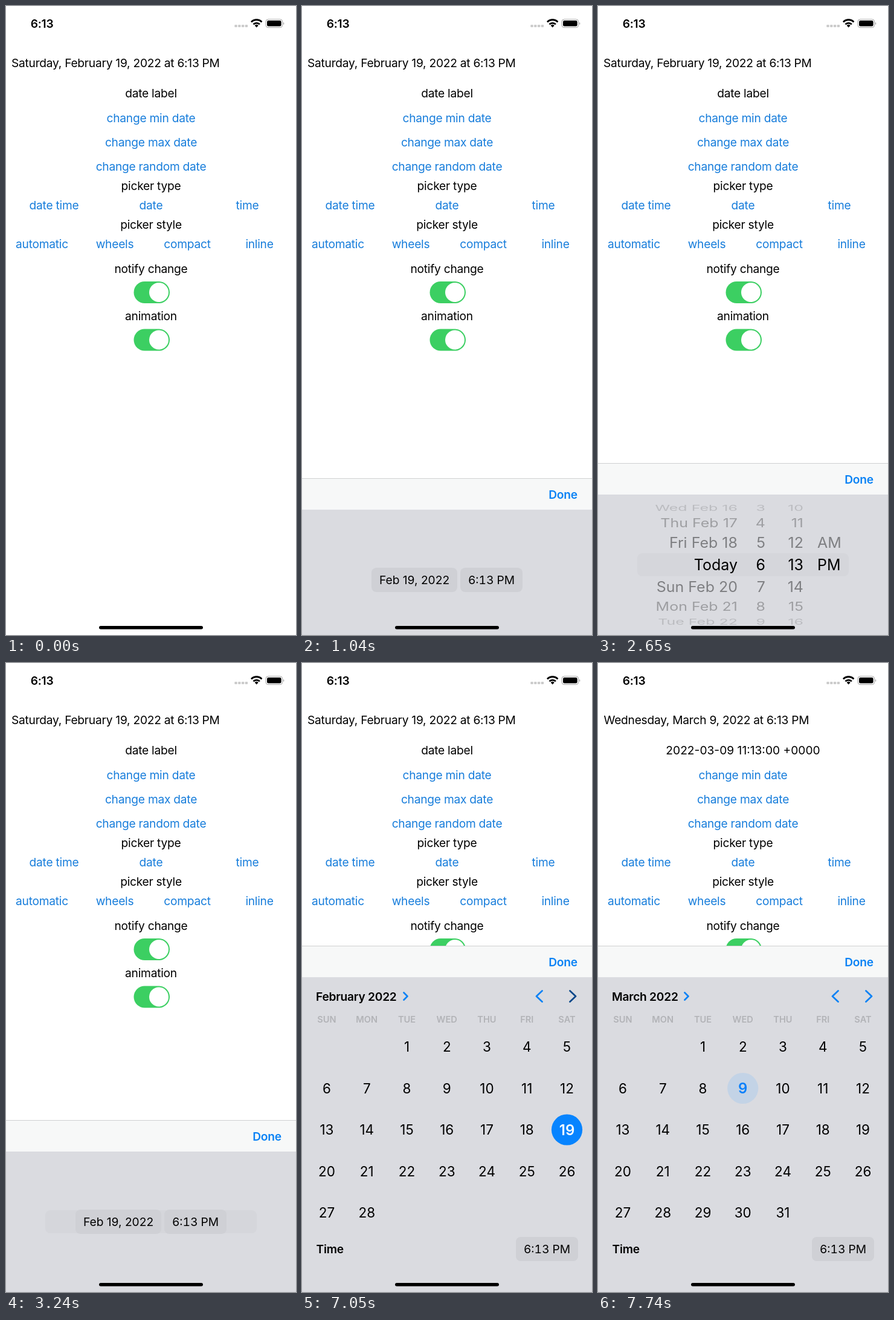
These frames come from a looping animation (480 by 1039 pixels, 8000 ms). An HTML page:

```html
<!DOCTYPE html>
<html lang="en">
<head>
<meta charset="utf-8">
<title>Date picker styles</title>
<style>
  html, body { margin: 0; width: 100%; height: 100%; overflow: hidden; background: #fff; }
  svg { display: block; width: 100vw; height: 100vh; }
  text { font: 400 19.2px Inter, "Open Sans", sans-serif; letter-spacing: -.0135em; white-space: pre; }
  .mid { text-anchor: middle; }
  .end { text-anchor: end; }
  .link { fill: #177ddb; }
  .bold { font-weight: 600; }
  .blue { fill: #0a82f5; }
  .chip { letter-spacing: 0; }
  .time { font-feature-settings: "tnum"; }
  .day { font-size: 22.5px; letter-spacing: 0; }
  .picked { font-size: 24px; font-weight: 600; letter-spacing: 0; }
  .week { font-size: 14.6px; font-weight: 600; letter-spacing: 0; fill: #b2b3b7; }
  .wheel { font-size: 25px; letter-spacing: 0; }
  .chevron { fill: none; stroke: #0a82f5; stroke-width: 2.7; stroke-linecap: round; stroke-linejoin: round; }

  /* Hard switches */
  .switch { animation: 8s step-end infinite; }
  #compact { animation-name: compact; }
  #wheels { animation-name: wheels; }
  #band { animation-name: band; }
  #inline { animation-name: inline; }
  #next { animation-name: press; }
  .before { animation-name: before; }
  .after { animation-name: after; }
  .february { animation-name: february; }
  .march { animation-name: march; }
  @keyframes compact { 0% { opacity: 1 } 33.125% { opacity: 0 } 40.5% { opacity: 1 } 50.5%, to { opacity: 0 } }
  @keyframes wheels { 0% { opacity: 0 } 33.125% { opacity: 1 } 40.5%, to { opacity: 0 } }
  @keyframes band { 0% { opacity: 0 } 33.125% { opacity: 1 } 50.5%, to { opacity: 0 } }
  @keyframes inline { 0% { opacity: 0 } 50.5%, to { opacity: 1 } }
  @keyframes press { 0% { stroke: #0a82f5 } 88.125% { stroke: #064789 } 90.125%, to { stroke: #0a82f5 } }
  @keyframes before { 0% { opacity: 1 } 96.75%, to { opacity: 0 } }
  @keyframes after { 0% { opacity: 0 } 96.75%, to { opacity: 1 } }
  @keyframes february { 0% { opacity: 1 } 92%, to { opacity: 0 } }
  @keyframes march { 0% { opacity: 0 } 92%, to { opacity: 1 } }

  /* Sheet spring and month paging */
  #sheet { animation: rise 8s linear infinite; }
  #pages { animation: page 8s linear infinite; }
  @keyframes rise {
    0% { transform: translateY(284px) }
    10% {
      transform: translateY(284px);
      animation-timing-function: linear(0, .068 5%, .21 10%, .507 20%, .723 30%, .853 40%, .925 50%, .963 60%, .991 80%, 1);
    }
    16.25%, to { transform: translateY(0) }
  }
  @keyframes page {
    0% { transform: translateX(0) }
    89.625% { transform: translateX(0); animation-timing-function: ease-in-out }
    94.125%, to { transform: translateX(-480px) }
  }
</style>
</head>
<body>
<svg id="stage" viewBox="0 0 480 1039"></svg>
<script>
const text = (x, y, label, cls = '') => `<text x="${x}" y="${y}" class="${cls}">${label}</text>`;
const rect = (x, y, w, h, fill, r = 0) =>
  `<rect x="${x}" y="${y}" width="${w}" height="${h}" rx="${r}" fill="${fill}"/>`;
const circle = (x, y, r, fill) => `<circle cx="${x}" cy="${y}" r="${r}" fill="${fill}"/>`;
const group = (attrs, ...parts) => `<g ${attrs}>${parts.join('')}</g>`;
const chevron = (x, y, w, h, attrs = 'class="chevron"') =>
  `<path ${attrs} d="M${x} ${y - h}l${w} ${h}l${-w} ${h}"/>`;
const count = (n, make) => Array.from({ length: n }, (_, i) => make(i)).join('');

const toggle = y => rect(211.5, y, 59.5, 36, '#3ccf62', 18) + circle(253, y + 18, 16, '#fff');

const statusBar = () => [
  text(59.5, 35.5, '6:13', 'mid bold'),
  count(4, i => rect(378.3 + i * 5.8, 31, 4.4, 4, '#cbcbcb', 1)),
  `<path d="M406 26.5a12 12 0 0 1 17.4 0M409.5 30.3a7.3 7.3 0 0 1 10.4 0" fill="none" stroke="#000" stroke-width="2.8"/>`,
  `<path d="M414.7 35.5l-3-3.2a4.3 4.3 0 0 1 6 0z"/>`,
  `<rect x="430" y="22" width="27.6" height="13.6" rx="4" fill="none" stroke="#a2a2a2"/>`,
  rect(432, 24, 23.6, 9.6, '#000', 2.4),
  `<path d="M459 26.4q2.6 2.4 0 4.8z" fill="#a2a2a2"/>`
].join('');

const form = () => [
  group('class="switch before"',
    text(9, 101, 'Saturday, February 19, 2022 at 6:13 PM'),
    text(240, 151, 'date label', 'mid')),
  group('class="switch after"',
    text(9.5, 101, 'Wednesday, March 9, 2022 at 6:13 PM'),
    text(240, 151, '2022-03-09 11:13:00 +0000', 'mid chip')),
  ...[[240, 192, 'change min date'], [240, 232, 'change max date'], [240, 272, 'change random date'],
    [79.5, 336, 'date time'], [240, 336, 'date'], [399.5, 336, 'time'],
    [59.5, 400, 'automatic'], [180, 400, 'wheels'], [300, 400, 'compact'], [419.5, 400, 'inline']
  ].map(([x, y, label]) => text(x, y, label, 'mid link')),
  ...[[304, 'picker type'], [368, 'picker style'], [441, 'notify change'], [519, 'animation']
  ].map(([y, label]) => text(240, y, label, 'mid')),
  toggle(455), toggle(533.5)
].join('');

const panel = top =>
  rect(0, top, 480, 1039 - top, '#dadbe0') +
  rect(0, top, 480, 52, '#f7f8f8') +
  rect(0, top, 480, 1, '#cfd0d1') +
  text(432, top + 34, 'Done', 'mid bold blue');

const chip = (x, y, w, label, cls = '') =>
  rect(x, y, w, 40, '#cfd0d5', 8) + text(x + w / 2, y + 27, label, 'mid chip ' + cls);

const dates = ['Wed Feb 16', 'Thu Feb 17', 'Fri Feb 18', 'Today', 'Sun Feb 20', 'Mon Feb 21', 'Tue Feb 22'];
const wheelRow = i => {
  const angle = (i - 3) * .33;
  const shade = [1, .42, .28, .14][Math.abs(i - 3)];
  const period = { 2: 'AM', 3: 'PM' }[i] || '';
  return group(
    `transform="translate(0 ${923 + 112 * Math.sin(angle)}) scale(1 ${Math.cos(angle)})" opacity="${shade}"`,
    text(231, 9, dates[i], 'wheel end'), text(277, 9, i + 3, 'wheel end'),
    text(340, 9, i + 10, 'wheel end'), text(363, 9, period, 'wheel'));
};

const dayX = column => 41 + column * 66.25;
const dayY = row => 634 + row * 68.5;
// Both months start on a Tuesday.
const month = days => count(days, i =>
  text(dayX((i + 2) % 7), dayY(Math.floor((i + 2) / 7)) + 8, i + 1, 'mid day'));
const picked = (column, row, day, disc, ink) =>
  circle(dayX(column), dayY(row), 25.6, disc) +
  `<g fill="${ink}">${text(dayX(column), dayY(row) + 8.7, day, 'mid picked')}</g>`;

const shortSheet = () => group('id="sheet"',
  panel(755),
  group('id="band" class="switch"', rect(65, 904, 350, 38, '#d5d6db', 8)),
  group('id="compact" class="switch"', chip(115, 903, 142, 'Feb 19, 2022'), chip(262, 903, 103, '6:13 PM', 'time')),
  group('id="wheels" class="switch"', count(7, wheelRow)));

const calendarSheet = () => group('id="inline" class="switch"',
  panel(467),
  group('class="switch february"', text(23, 557.5, 'February 2022', 'bold'), chevron(168.5, 550.5, 6, 6)),
  group('class="switch march"', text(23, 557.5, 'March 2022', 'bold'), chevron(143.5, 550.5, 6, 6)),
  chevron(397.5, 550.5, -9.5, 9),
  chevron(443.5, 550.5, 9.5, 9, 'id="next" class="chevron switch"'),
  ...['SUN', 'MON', 'TUE', 'WED', 'THU', 'FRI', 'SAT'].map((name, i) => text(dayX(i), 594.3, name, 'mid week')),
  group('id="pages"',
    month(28), picked(6, 2, 19, '#0784ff', '#fff'),
    group('transform="translate(480 0)"',
      month(31),
      group('class="switch after"', picked(3, 1, 9, '#c3d3e6', '#0a80fa')))),
  text(23.5, 975, 'Time', 'bold'),
  chip(354, 948, 103, '6:13 PM', 'time'));

document.getElementById('stage').innerHTML =
  statusBar() + form() + shortSheet() + calendarSheet() + rect(154, 1024, 172, 5.5, '#000', 2.75);
</script>
</body>
</html>
```
